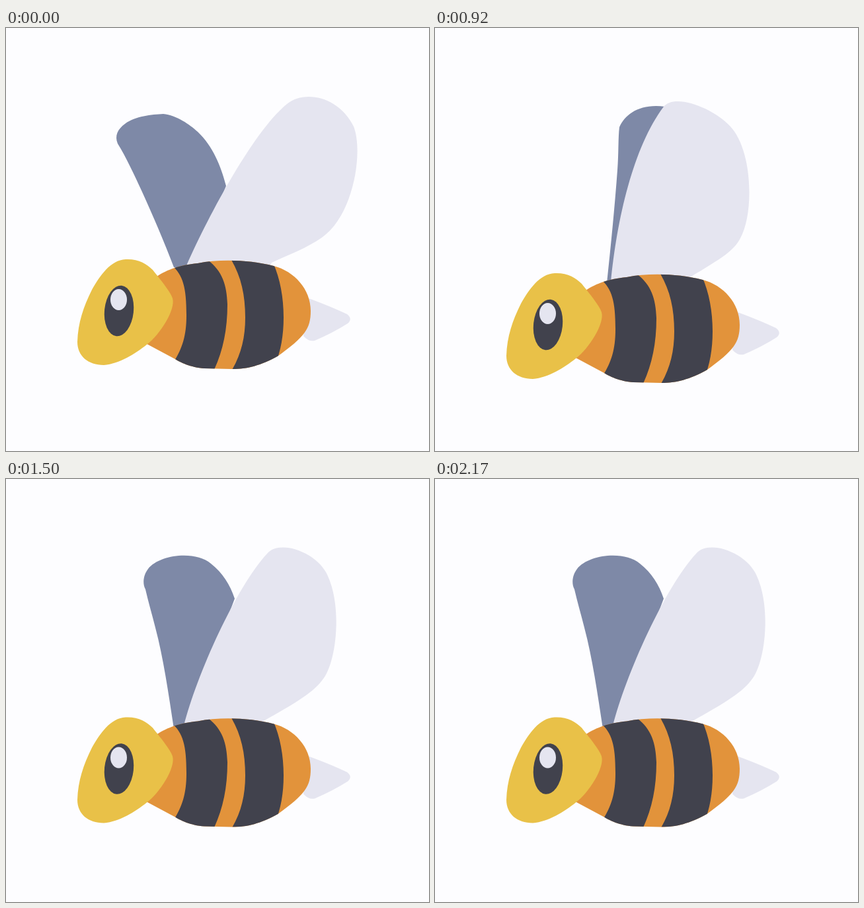
These frames come from a looping animation (640 by 640 pixels, 2260 ms). An HTML page without scripts:

```html
<!DOCTYPE html>
<html lang="en">
<head>
<meta charset="utf-8">
<title>Bee</title>
<style>
  :root { --loop: 2260ms; --lead: -9ms; }
  html, body { margin: 0; width: 100%; height: 100%; overflow: hidden; background: #fdfdff; }
  svg { display: block; width: 100%; height: 100%; overflow: hidden; }
  .back { fill: #7e89a7; }
  .pale { fill: #e5e5f0; }
  .dark { fill: #41424d; }
  .head { fill: #e9c148; }
  .body { fill: #e2933b; }

  /* Nine wing beats of three poses; after beats 4 and 8 one pose is skipped. */
  .flap { animation: flap calc(var(--loop) / 9) steps(3) var(--lead) infinite; }
  .skip { animation: skip var(--loop) step-end var(--lead) infinite; }
  @keyframes flap { from { transform: translateX(0); } to { transform: translateX(-1920px); } }
  @keyframes skip {
    0% { transform: translateX(0); }
    44.44% { transform: translateX(-640px); }
    88.88% { transform: translateX(-1280px); }
  }
</style>
</head>
<body>
<svg viewBox="0 0 640 640">
  <defs>
    <path id="torso" d="M213 478L228 376C245 365 262 359 290 356C325 349 370 351 405 360C436 368 461 395 461 428C461 455 452 467 412 496C385 511 365 516 342 516L300 515C280 514 262 505 256 501Z"/>
    <clipPath id="trim"><use href="#torso"/></clipPath>
    <g id="bee">
      <path class="pale" d="M455 408L466 412Q495 423 516 433Q525 440 517 447Q495 461 467 473Q458 475 450 466Z"/>
      <use class="body" href="#torso"/>
      <g class="dark" clip-path="url(#trim)">
        <path d="M250 358C268 374 273 392 273 435C273 465 267 484 254 505L311 525C327 494 335 460 335 418C334 388 327 367 304 350Z"/>
        <path d="M338 346C355 373 362 402 362 438C362 470 355 497 339 522L407 510C416 488 420 465 420 438C420 408 415 380 404 355Z"/>
      </g>
      <path class="head" d="M181 350C200 349 213 357 222 366C233 380 249 399 252 409C257 426 233 464 213 479C195 493 172 508 148 510C124 510 108 496 108 475C109 446 117 422 130 396C142 375 158 351 181 350Z"/>
      <ellipse class="dark" cx="171" cy="428" rx="22" ry="38.5" transform="rotate(6 171 428)"/>
      <ellipse class="pale" cx="170.5" cy="411" rx="12.5" ry="16"/>
    </g>

    <g id="open">
      <path class="back" d="M254 362C240 325 222 283 206 248C194 222 182 196 169 175C164 163 169 153 180 145C196 133 220 131 238 130C258 132 278 146 290 157C313 179 325 208 333 239L280 366Z"/>
      <path class="pale" d="M272 362C300 297 372 158 425 115C452 93 504 104 526 149C541 187 526 284 478 317C455 333 430 342 402 355L380 390H300Z"/>
      <use href="#bee"/>
    </g>
    <g id="mid">
      <path class="back" d="M254 378C246 325 238 270 226 225C221 205 215 185 211 167C206 158 208 145 215 136C232 114 287 108 310 128C328 142 339 160 346 181L272 378Z"/>
      <path class="pale" d="M269 374C288 297 349 162 395 113C414 90 473 112 487 147C509 195 500 280 478 305C462 326 430 343 390 366L380 400H290Z"/>
      <use href="#bee" y="10.5"/>
    </g>
    <g id="shut">
      <path class="back" d="M260 386C266 330 272 270 276 215C278 190 277 165 279 150C288 130 310 114 348 119L300 300L275 386Z"/>
      <path class="pale" d="M266 386C275 290 300 180 346 119C363 98 422 122 446 148C481 184 483 280 462 318C452 337 436 347 386 377L380 410H290Z"/>
      <use href="#bee" y="21"/>
    </g>
  </defs>

  <g class="skip">
    <g class="flap">
      <use href="#open"/>
      <use href="#mid" x="640"/>
      <use href="#shut" x="1280"/>
      <use href="#open" x="1920"/>
      <use href="#mid" x="2560"/>
    </g>
  </g>
</svg>
</body>
</html>
```
